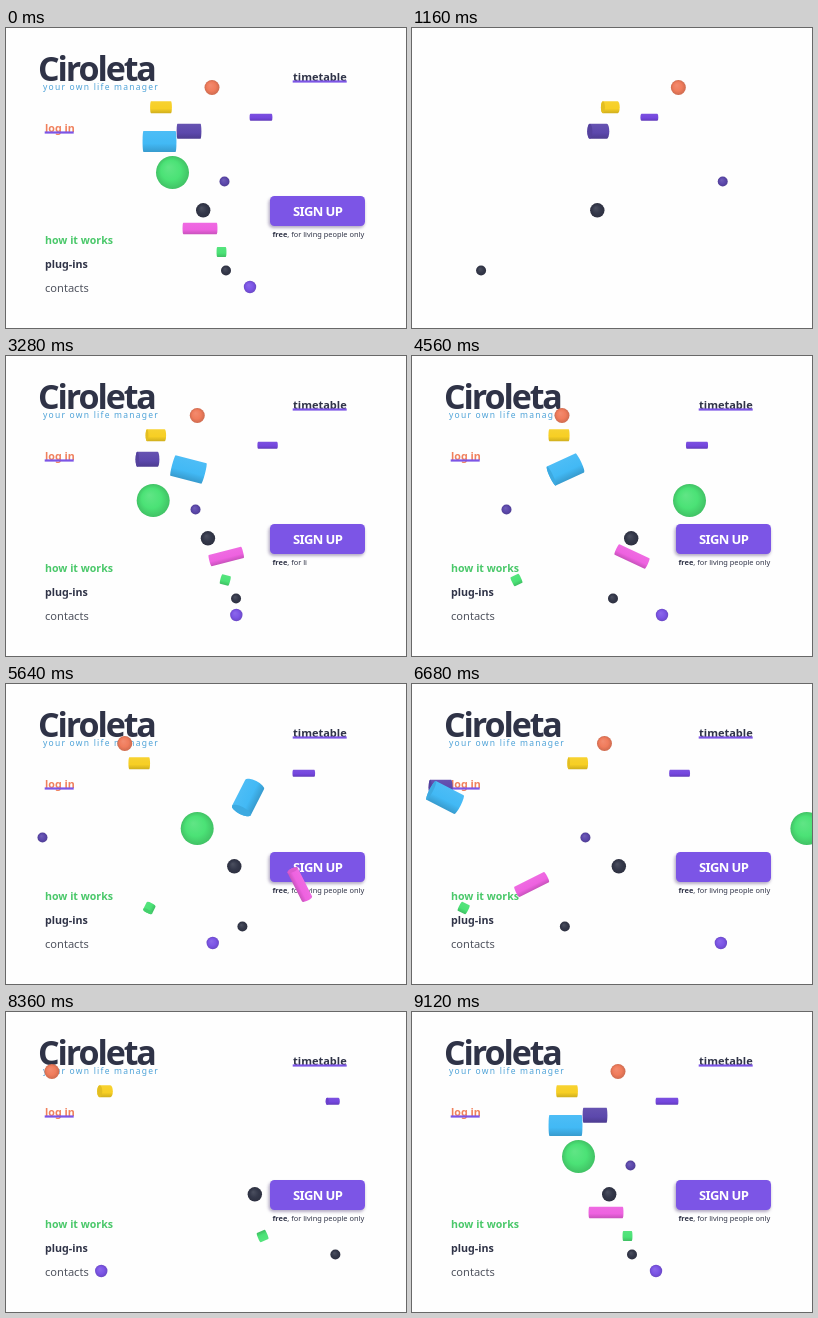
An HTML page with a canvas that plays this animation: 400x300 px, repeating every 9160 ms.

```html
<!DOCTYPE html>
<html lang="en">
<head>
<meta charset="utf-8">
<title>Ciroleta</title>
<style>
  html, body { margin: 0; width: 100%; height: 100%; overflow: hidden; background: #fefefe; }
  #ui, #toys { position: absolute; left: 0; top: 0; width: 400px; height: 300px; }
  text { font-family: "Noto Sans", "Open Sans", sans-serif; font-weight: 700; fill: #2f3347; white-space: pre; }
  .light { font-weight: 400; }
</style>
</head>
<body>
<svg id="ui" viewBox="0 0 400 300">
  <defs>
    <filter id="soft" x="-20%" y="-40%" width="140%" height="180%"><feGaussianBlur stdDeviation="1.6"/></filter>
  </defs>
  <g id="button">
    <rect x="262.5" y="170" width="96" height="30" rx="5" fill="#6b5a8c" opacity=".5" filter="url(#soft)"/>
    <rect x="264" y="168" width="95" height="30" rx="4.5" fill="#7c55e6"/>
    <text x="287" y="188" font-size="13" letter-spacing="-.6" style="fill:#fff">SIGN UP</text>
  </g>
  <text x="266.5" y="208.5" font-size="7.4"><tspan id="lead"></tspan><tspan id="rest" class="light"></tspan></text>
</svg>
<canvas id="toys" width="400" height="300"></canvas>
<script>
const FRAME = 40, LOOP = 9160;
const CAPTION = "free, for living people only";
const INK = "#2f3347", VIOLET = "#7c55e6", PLUM = "#5c48ac", GREEN = "#4be276";

const byId = id => document.getElementById(id);
const clamp = v => Math.max(0, Math.min(1, v));
const mix = (a, b, s) => a + (b - a) * s;
const easeOut = v => 1 - (1 - clamp(v)) ** 3;
const easeInOut = v => v < .5 ? 2 * clamp(v) ** 2 : 1 - 2 * (1 - clamp(v)) ** 2;

// ---- page text, each line rising out of its own clip ----
const lines = [];

function add(parent, name, attrs) {
  const el = document.createElementNS("http://www.w3.org/2000/svg", name);
  for (const key in attrs) el.setAttribute(key, attrs[key]);
  return parent.appendChild(el);
}

function line(words, x, y, size, { color = INK, spacing = 0, light = false, bar = 0 } = {}) {
  const drop = size * 1.4, left = x - 5, top = y - size * 1.1;
  const box = add(byId("ui"), "svg", {
    x: left, y: top, width: 140, height: drop, viewBox: `${left} ${top} 140 ${drop}`
  });
  const el = add(box, "g", {});
  const text = add(el, "text", {
    x, y, "font-size": size, "letter-spacing": spacing, style: `fill:${color}`, class: light ? "light" : ""
  });
  text.textContent = words;
  if (bar) add(el, "rect", { x: x - .3, y: y - .6, width: bar, height: 2.2, fill: VIOLET });
  lines.push({ el, drop, start: 1440 + FRAME * lines.length });
}

line("Ciroleta", 32, 53, 34, { spacing: -2.1 });
line("your own life manager", 37, 61.5, 8.5, { color: "#4fa3d8", spacing: 1.23, light: true });
line("timetable", 287, 53, 11, { bar: 54 });
line("log in", 39, 104, 10.7, { color: "#f0805c", bar: 29 });
line("how it works", 39, 216, 10.6, { color: "#4ac86a" });
line("plug-ins", 39, 239.5, 10.7);
line("contacts", 39, 264, 11.1, { color: "#50545f", light: true });

function drawUi(t) {
  const whole = t < FRAME;
  for (const { el, drop, start } of lines) {
    const p = whole ? 1 : easeOut((t - start) / 640);
    el.setAttribute("transform", `translate(0 ${(1 - p) * drop})`);
  }
  const k = whole ? 1 : easeOut((t - 2480) / 360);
  byId("button").setAttribute("transform", `translate(311.5 183) scale(${k}) translate(-311.5 -183)`);
  const n = whole ? CAPTION.length : Math.max(0, Math.floor((t - 2800) / FRAME));
  byId("lead").textContent = CAPTION.slice(0, Math.min(4, n));
  byId("rest").textContent = CAPTION.slice(4, Math.max(4, n));
}

// ---- toys: near = shift in the first scattered pose, mid = shift halfway to the far pose ----
const ctx = byId("toys").getContext("2d");
const toys = [];
const ball = (color, x, y, r, near, mid) => toys.push({ draw: drawBall, color, x, y, r, near, mid });
const rod = (color, x, y, len, r, near, mid, spin) =>
  toys.push({ draw: drawRod, color, x, y, len, r, near, mid, spin });

// a rod yaws when spin is 0, otherwise it rolls in that direction
ball("#f07c5c", 206, 59.5, 7.5, -183, -56);
rod("#f7cf24", 155, 79.3, 20, 6, -64, -8, 0);
rod("#7446de", 255, 89.2, 21, 3.5, 82, 30, 0);
rod(PLUM, 183, 103.3, 23, 7.5, -516, -245, 0);
rod("#42b9f5", 153.5, 113.5, 33, 10.5, 360, 0, 1);
ball(GREEN, 166.5, 144.5, 16.5, -240, 111);
ball(PLUM, 218.5, 153.5, 5, -360, -124);
ball("#34384a", 197.2, 182.3, 7.2, 59, 22);
rod("#ee62e0", 194, 200.5, 34, 5.7, 326, 26, -1);
rod(GREEN, 215.5, 224, 9, 5, 47, -111, 1);
ball("#34384a", 220, 242.5, 5, 125, -19);
ball(VIOLET, 244, 259, 6.2, -170, 6);

const poses = {
  rest: { shift: () => 0, roll: 0, yaw: 0 },
  near: { shift: o => o.near, roll: 180, yaw: 345 },
  far: { shift: o => 2 * o.mid - o.near, roll: 490, yaw: 405 }
};
const route = "rest far near rest near far near far near rest".split(" ");
const BEAT = (LOOP - FRAME) / (route.length - 1);

// lighter for k > 0, darker for k < 0
function tone(hex, k) {
  const part = i => parseInt(hex.slice(i, i + 2), 16);
  const c = [1, 3, 5].map(i => Math.round(mix(part(i), k > 0 ? 255 : 0, Math.abs(k))));
  return `rgb(${c})`;
}

function shade(gradient, hex, top, edge) {
  gradient.addColorStop(0, tone(hex, top));
  gradient.addColorStop(.6, hex);
  gradient.addColorStop(1, tone(hex, edge));
  return gradient;
}

function drawBall({ r, color }) {
  ctx.fillStyle = shade(ctx.createRadialGradient(-r / 4, -r / 3, 0, 0, 0, r), color, .12, -.14);
  ctx.beginPath();
  ctx.arc(0, 0, r, 0, 7);
  ctx.fill();
}

function drawRod({ len, r, color, spin }, roll, yaw) {
  const tilt = roll * spin, turn = spin ? 0 : yaw;
  const half = len / 2 * Math.abs(Math.cos(turn));
  const cap = Math.max(.9, r * (.5 * Math.abs(Math.sin(turn)) + .4 * Math.abs(Math.sin(tilt))));
  const body = half - (spin ? cap / 2 : 0);
  const quarter = Math.PI / 2;
  ctx.rotate(tilt);
  ctx.fillStyle = shade(ctx.createLinearGradient(0, -r, 0, r), color, .06, -.16);
  ctx.beginPath();
  ctx.ellipse(body, 0, cap, r, 0, -quarter, quarter);
  ctx.ellipse(-body, 0, cap, r, 0, quarter, 3 * quarter);
  ctx.fill();
  if (cap > 1.2) {
    ctx.fillStyle = tone(color, -.08);
    ctx.beginPath();
    ctx.ellipse(-body, 0, cap, r, 0, 0, 7);
    ctx.fill();
  }
}

function drawToys(t) {
  const i = Math.min(route.length - 2, Math.floor(t / BEAT));
  const from = poses[route[i]], to = poses[route[i + 1]];
  // a moment's pause whenever the column has formed
  const pause = from === poses.rest ? 46 : 0;
  const s = easeInOut((t - i * BEAT - pause) / (BEAT - pause));
  const angle = key => mix(from[key], to[key], s) * Math.PI / 180;
  ctx.clearRect(0, 0, 400, 300);
  for (const o of toys) {
    ctx.save();
    ctx.translate(o.x + mix(from.shift(o), to.shift(o), s), o.y);
    o.draw(o, angle("roll"), angle("yaw"));
    ctx.restore();
  }
}

const begin = performance.now();
function tick() {
  const t = Math.floor((performance.now() - begin) % LOOP / FRAME) * FRAME;
  drawUi(t);
  drawToys(t);
  requestAnimationFrame(tick);
}
tick();
</script>
</body>
</html>
```
